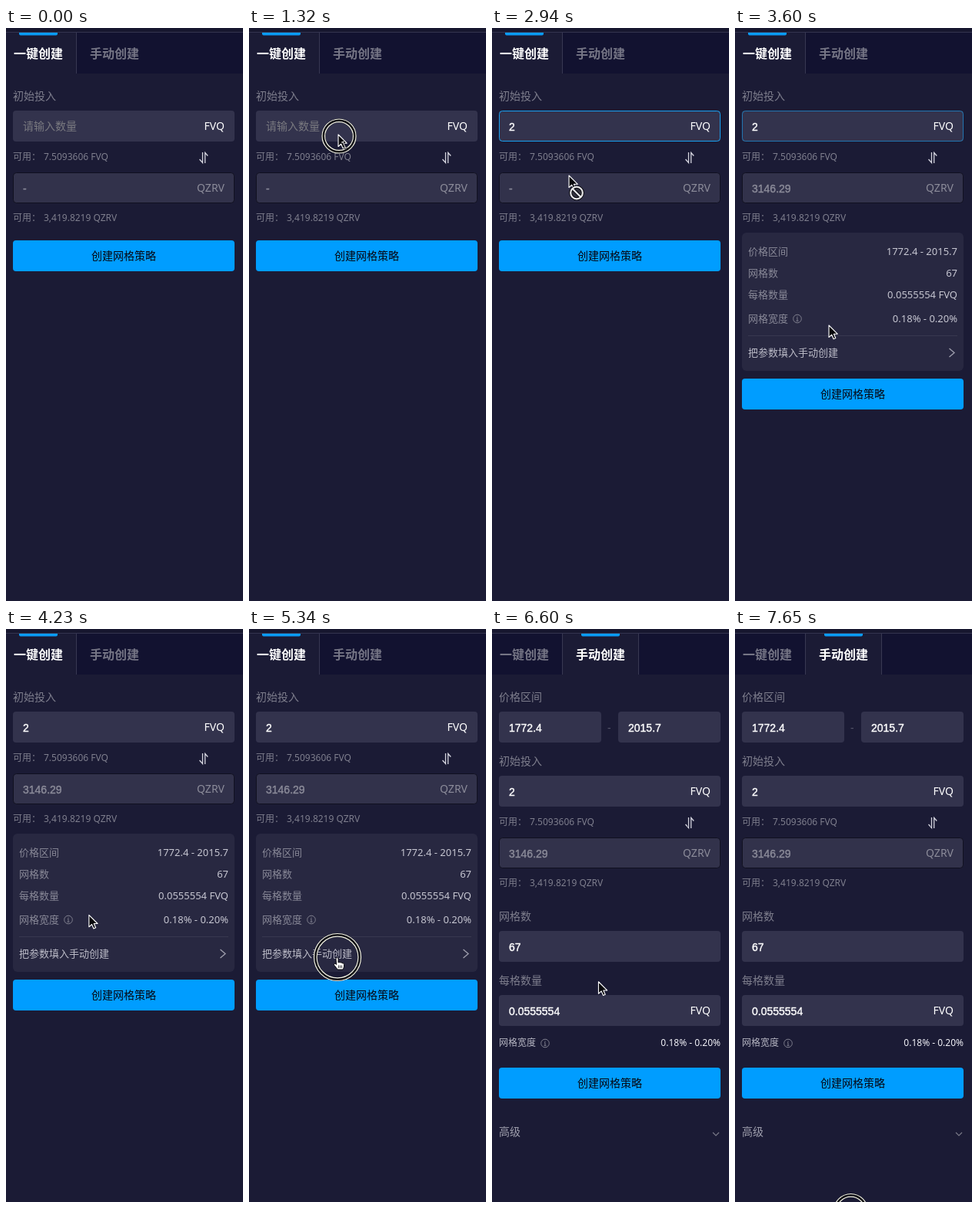
Animation of 308 by 742 pixels, one loop 7.68 s. Source, as an HTML page:

```html
<!DOCTYPE html>
<html lang="zh-CN">
<head>
<meta charset="utf-8">
<style>
html, body { margin: 0; width: 100%; height: 100%; overflow: hidden; background: #1b1b35; }
svg { display: block; width: 308px; height: 742px; }
text { font-family: "Noto Sans", "Noto Sans CJK SC", "Noto Sans CJK", sans-serif; }
.num { font-family: "Liberation Sans", Arial, sans-serif; stroke-width: .4px; }
</style>
</head>
<body>
<svg id="stage" viewBox="0 0 308 742" xmlns="http://www.w3.org/2000/svg"></svg>
<script>
const LOOP = 7680;
const COIN = 'FVQ', CASH = 'QZRV';
const BLUE = '#009dff', MUTED = '#7e7e8d', SOFT = '#c6c6d1', WHITE = '#fff';
const stage = document.getElementById('stage');

function add(parent, tag, attrs = {}, content) {
  const node = document.createElementNS('http://www.w3.org/2000/svg', tag);
  for (const key in attrs) node.setAttribute(key, attrs[key]);
  if (content) node.textContent = content;
  return parent.appendChild(node);
}
const group = (parent, attrs) => add(parent, 'g', attrs);
const rect = (p, x, y, width, height, fill, rx = 0) =>
  add(p, 'rect', { x, y, width, height, fill, rx });
const line = (p, d, stroke, width = 1) =>
  add(p, 'path', { d, stroke, fill: 'none', 'stroke-width': width });

// Text is placed by its vertical middle.
function label(p, x, mid, str, size, fill, opts = {}) {
  return add(p, 'text', { x, y: mid + size * 0.36, 'font-size': size, fill, ...opts }, str);
}
const right = (p, x, mid, str, size, fill) =>
  label(p, x, mid, str, size, fill, { 'text-anchor': 'end' });
const number = (p, x, mid, str, fill = WHITE) =>
  label(p, x, mid, str, 14, fill, { class: 'num', stroke: fill });

function field(p, y, value, unit, x = 9, width = 288) {
  rect(p, x, y, width, 40, '#33334d', 4);
  if (unit) right(p, 284, y + 20, unit, 14, WHITE);
  return number(p, x + 13, y + 21, value);
}

function info(p, cx, cy) {
  add(p, 'circle', { cx, cy, r: 5.3, fill: 'none', stroke: MUTED });
  line(p, `M${cx} ${cy - 3}v1.3M${cx - 1} ${cy - .8}h1v3.6M${cx - 1.5} ${cy + 2.8}h3`, MUTED);
}

function button(p, y) {
  rect(p, 9, y, 288, 40, BLUE, 4);
  label(p, 153, y + 20, '创建网格策略', 14, '#06060f', { 'text-anchor': 'middle' });
}

// Both funding fields with their balances.
function funding(p, top, value, other) {
  const g = group(p, { transform: `translate(0 ${top})` });
  label(g, 9, 0, '初始投入', 14, MUTED);
  const amount = field(g, 19, value, COIN);
  label(g, 9, 79, '可用：', 12, MUTED);
  label(g, 49, 79, '7.5093606 ' + COIN, 12, MUTED);
  line(g, 'M251.5 82l4 4.5V73M258.700 87V73.500l3.600 4', '#d4d4de', 1.3);
  add(g, 'rect', { x: 9.5, y: 99.5, width: 287, height: 39, rx: 4, fill: '#32324b', stroke: '#101020' });
  const pair = number(g, 22, 120, other, '#8c8c9a');
  right(g, 284, 119, CASH, 14, '#8c8c9a');
  label(g, 9, 158, '可用：', 12, MUTED);
  label(g, 49, 158, '3,419.8219 ' + CASH, 12, MUTED);
  return { amount, pair };
}

function tabs(p, active) {
  rect(p, 0, 0, 308, 5, '#17172f');
  rect(p, 0, 6, 308, 53, '#121230');
  rect(p, active ? 92 : 0, 6, active ? 98 : 91, 53, '#1b1b35');
  rect(p, 0, 5, 308, 1, '#34344f');
  line(p, active ? 'M91.5 6V59M190.500 6V59' : 'M91.5 6V59', '#383852');
  add(p, 'path', { d: `M${active ? 116 : 17} 6h50v1.500q0 2-2 2h-46q-2 0-2-2z`, fill: '#0a9cf8' });
  ['一键创建', '手动创建'].forEach((str, i) =>
    label(p, i ? 109 : 10, 33, str, 16, i === active ? WHITE : '#757585', { 'font-weight': 700 }));
}

// Quick view
const quick = group(stage);
tabs(quick, 0);
const { amount, pair } = funding(quick, 88, '', '-');
const hint = label(quick, 22, 127, '请输入数量', 14, '#7a7a80');
const focus = add(quick, 'rect',
  { x: 9.5, y: 107.5, width: 287, height: 39, rx: 4, fill: 'none', stroke: '#18a0f0' });
const caret = rect(quick, 22, 119, 1, 16, WHITE);
const before = group(quick);
button(before, 275);
const after = group(quick);
rect(after, 9, 265, 288, 179, '#282841', 6);
[
  [289, '价格区间', '1772.4 - 2015.7'],
  [317, '网格数', '67'],
  [345, '每格数量', '0.0555554 ' + COIN],
  [376, '网格宽度', '0.18% - 0.20%']
].forEach(([y, name, value]) => {
  label(after, 17, y, name, 13, '#888897');
  right(after, 289, y, value, 13, SOFT);
});
info(after, 81, 376.500);
line(after, 'M17 398.5H289', '#38384f');
label(after, 17, 420, '把参数填入手动创建', 13, '#bcbcc8');
line(after, 'M278.500 415l6.500 5.500-6.500 5.500', '#a0a0ae', 1.3);
button(after, 454);

// Manual view
const manual = group(stage);
tabs(manual, 1);
label(manual, 9, 88, '价格区间', 14, MUTED);
field(manual, 107, '1772.4', '', 9, 133);
label(manual, 150, 128, '-', 14, '#55556a');
field(manual, 107, '2015.7', '', 164, 133);
funding(manual, 171, '2', '3146.29');
label(manual, 9, 372, '网格数', 14, MUTED);
field(manual, 391, '67');
label(manual, 9, 455, '每格数量', 14, MUTED);
field(manual, 474, '0.0555554', COIN);
label(manual, 9, 536, '网格宽度', 12, '#b4b4c0', { 'font-weight': 500 });
info(manual, 69, 536.500);
right(manual, 297, 536, '0.18% - 0.20%', 12, '#f0f0f6');
button(manual, 568);
label(manual, 9, 651, '高级', 14, '#a0a0ae', { 'font-weight': 500 });
line(manual, 'M287 652l4 4 4-4', '#7c7c8a', 1.1);

// Click ring
const ring = group(stage);
const circle = (stroke, width) =>
  add(ring, 'circle', { fill: 'none', stroke, 'stroke-width': width });
const band = circle('#0b0b12', 5), outer = circle('#f4f4e6', 1.2), inner = circle('#f4f4e6', 1.2);

// Pointer shapes, hotspot at 0,0
const pointer = group(stage);
const ARROW = 'M0 0V15.500L3.700 12.200 6.100 17.700 8.800 16.500 6.400 11.200H11.200Z';
const solid = (p, d) => add(p, 'path',
  { d, fill: '#08080c', stroke: WHITE, 'stroke-width': 1.1, 'stroke-linejoin': 'round' });
const beam = (p, d) => { line(p, d, '#08080c', 3.2); line(p, d, WHITE, 1.3); };
const shapes = {};
for (const name of ['arrow', 'drag', 'deny', 'hand', 'beam']) shapes[name] = group(pointer);
solid(shapes.arrow, ARROW);
solid(shapes.drag, ARROW);
beam(group(shapes.drag, { transform: 'translate(7.500 13) rotate(-25) scale(.7)' }),
  'M-3-6q3 0 3 2V5q0 2 3 2M3-6q-3 0-3 2M-3 7q3 0 3-2');
solid(shapes.deny, ARROW);
for (const [stroke, width] of [['#08080c', 4], ['#e8e8ea', 2.2]]) {
  add(shapes.deny, 'circle', { cx: 10, cy: 22.500, r: 7.800, fill: stroke === '#08080c' ? '#33333f' : 'none', stroke, 'stroke-width': width });
  line(shapes.deny, 'M4.500 17L15.500 28', stroke, width);
}
add(shapes.hand, 'path', {
  d: 'M-2 1Q-2-.5-.6-.5T1 1V6Q2 4.700 3.400 6 5 5 6 6.700 8.500 6 8.500 8.500V11Q8 13.500 7 15H0Q-1.500 12.500-4 9.700-5.300 8-3.800 7.300-2.800 7-1.500 8.600Z',
  fill: WHITE, stroke: '#08080c', 'stroke-width': 1, 'stroke-linejoin': 'round'
});
line(shapes.hand, 'M1.500 9.500V13M3.500 9.500V13M5.500 9.500V13', '#08080c', .8);
beam(shapes.beam, 'M-4-8H-2Q0-8 0-6V6Q0 8-2 8H-4M4-8H2Q0-8 0-6M0 6Q0 8 2 8H4M-2 3H2');

// Timeline
const smooth = u => u * u * (3 - 2 * u), easeIn = u => u * u, easeOut = u => 1 - (1 - u) ** 2;
const PATH = [
  [0, 150, 754], [360, 150, 754], [990, 115, 145, smooth], [1170, 115, 145],
  [1200, 116, 138], [2610, 116, 138], [2940, 100, 191, smooth], [3360, 121, 361, smooth],
  [3600, 122, 385, easeOut], [4110, 106, 356, smooth], [4170, 106, 356],
  [4380, 115, 426, smooth], [5430, 115, 426], [5850, 132, 110, smooth],
  [6000, 132, 110], [6750, 142, 650, easeIn], [7320, 150, 754, easeOut], [LOOP, 150, 754]
];
const CLICKS = [[1200, 360, 117, 140, 22], [5340, 180, 115, 425, 30.500], [7650, 360, 150.5, 753.500, 22]];
const SWITCH = 5430, FILL = 3390, TYPED = 2070;

const clamp = v => Math.max(0, Math.min(1, v));
const ramp = (t, a, b) => clamp((t - a) / (b - a));
const show = (node, on) => { node.style.display = on ? '' : 'none'; };
const within = (y, ...tops) => tops.some(top => y >= top && y <= top + 40);

function position(t) {
  const i = PATH.findIndex(step => t < step[0]);
  const [t0, x0, y0] = PATH[i - 1], [t1, x1, y1, ease = u => u] = PATH[i];
  const u = ease(ramp(t, t0, t1));
  return [x0 + (x1 - x0) * u, y0 + (y1 - y0) * u];
}

function shapeAt(t, y) {
  if (t >= SWITCH) {
    if (within(y, 107, 190, 391, 474)) return 'beam';
    if (within(y, 270)) return 'deny';
    return within(y, 568) ? 'hand' : 'arrow';
  }
  if (within(y, 107)) return 'drag';
  if (within(y, 187)) return 'deny';
  const clickable = t < FILL ? within(y, 275) : y > 404;
  return clickable ? 'hand' : 'arrow';
}

function render(t) {
  const typed = t >= TYPED, filled = t >= FILL;
  show(quick, t < SWITCH);
  show(manual, t >= SWITCH);
  show(before, !filled);
  show(after, filled);
  show(hint, !typed);
  amount.textContent = typed ? '2' : '';
  pair.textContent = filled ? '3146.29' : '-';
  focus.setAttribute('opacity', ramp(t, 1740, 1980) * (1 - ramp(t, FILL, 3930)));
  show(caret, t >= 1770 && t < 2610);
  caret.setAttribute('x', typed ? 30 : 22);

  const [x, y] = position(t);
  const kind = shapeAt(t, y);
  show(pointer, t < 1770 || t >= 2610);
  pointer.setAttribute('transform', `translate(${x} ${y})`);
  for (const name in shapes) show(shapes[name], name === kind);

  const click = CLICKS.find(([start, span]) => t >= start && t < start + span);
  show(ring, click);
  if (click) {
    const [start, span, cx, cy, r] = click;
    ring.setAttribute('transform', `translate(${cx} ${cy})`);
    ring.setAttribute('opacity', 1 - ramp(t, start + span * .6, start + span));
    outer.setAttribute('r', r);
    band.setAttribute('r', r - 1.8);
    inner.setAttribute('r', r - 3.600);
  }
}

const began = performance.now();
function tick() {
  render((performance.now() - began) % LOOP);
  requestAnimationFrame(tick);
}
tick();
</script>
</body>
</html>
```
